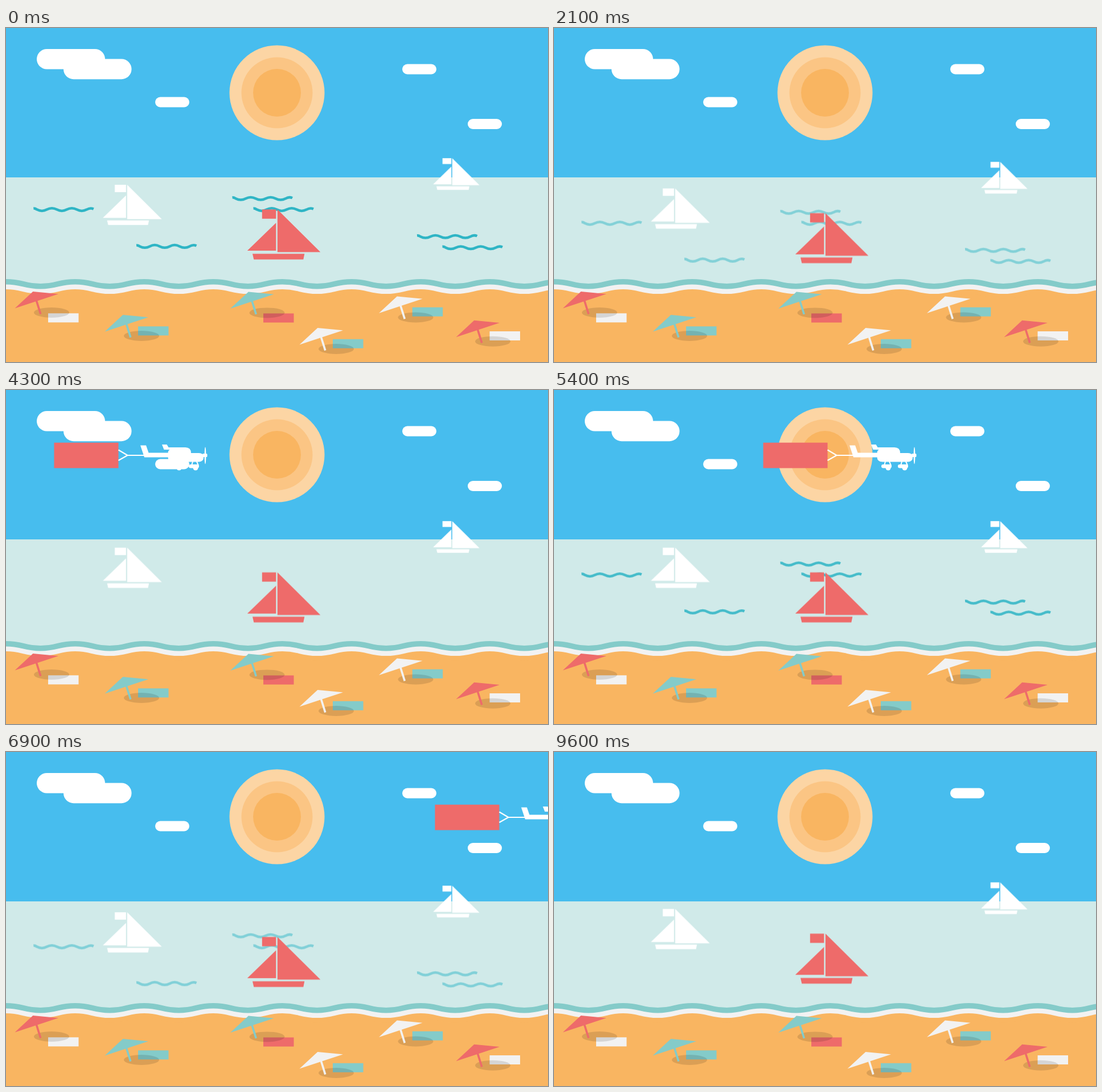
These frames come from a looping animation (952 by 588 pixels, 9700 ms). An HTML page:

```html
<!DOCTYPE html>
<html lang="en">
<head>
<meta charset="utf-8">
<title>Beach</title>
<style>
  html, body { margin: 0; width: 100%; height: 100%; overflow: hidden; background: #47bdee; }
  svg { display: block; width: 100%; height: 100%; }
  :root { --red: #ee6b6a; --teal: #84cbc9; --pale: #f2f2f2; --sand: #f9b561; }

  .ripples { fill: none; stroke: #2fb5c5; stroke-width: 4.5; animation: drift 9.7s infinite; }
  .bob { animation: bob 9.7s infinite; }
  .plane { animation: fly 9.7s infinite; }

  /* Motion advances ten times a second. */
  @keyframes drift {
    0% { transform: translateY(0); opacity: 1; animation-timing-function: steps(40); }
    41.237% { transform: translateY(46px); opacity: 0; animation-timing-function: step-end; }
    50.515% { transform: translateY(.4px); opacity: .98; animation-timing-function: steps(40); }
    91.753%, 100% { transform: translateY(46px); opacity: 0; }
  }
  @keyframes bob {
    0% { transform: translateY(0); animation-timing-function: steps(24); }
    24.742% { transform: translateY(7.4px); animation-timing-function: steps(24); }
    49.485% { transform: translateY(.1px); animation-timing-function: step-end; }
    50.515% { transform: translateY(.1px); animation-timing-function: steps(24); }
    75.258% { transform: translateY(7.4px); animation-timing-function: steps(24); }
    100% { transform: translateY(0); }
  }
  @keyframes fly {
    0%, 28.866% { transform: translateX(-669px); animation-timing-function: steps(50); }
    80.412%, 100% { transform: translateX(617.5px); }
  }
</style>
</head>
<body>
<svg viewBox="0 0 952 588" preserveAspectRatio="none">
  <defs>
    <path id="ripple" d="M0-2Q3-2.2 6 0q8.75 4.6 17.5 0t17.5 0 17.5 0 17.5 0 17.5 0q6-3.8 12-1"/>
    <path id="shore" d="M-30.4 450.5q30.35-8 60.7 0t60.7 0 60.7 0 60.7 0 60.7 0 60.7 0 60.7 0 60.7 0 60.7 0 60.7 0 60.7 0 60.7 0 60.7 0 60.7 0 60.7 0 60.7 0 60.7 0"/>
    <g id="boat">
      <path d="M25.5 0H50V16.2H25.5zM52.5 0L128 75H52.5zM50 23.3V72.5H-.5zM8.7 78H100L98 88H11z"/>
    </g>
    <g id="umbrella">
      <ellipse cx="80" cy="501" rx="31" ry="9" fill="#000" fill-opacity=".12"/>
      <path d="M15.5 493.5L47.3 464 92 468.3zM52 481.5l3.4-1.2L62.5 503l-3.4 1.2z"/>
    </g>
    <rect id="towel" width="53.5" height="16"/>
    <rect id="puff" width="60" height="18" rx="9"/>
    <g id="gear">
      <path d="M7 126L5 133M14 126l3 7" stroke="#fff" stroke-width="2"/>
      <rect y="131" width="18" height="6.5" rx="3.2"/>
      <circle cx="12" cy="137" r="4.5"/>
    </g>
  </defs>

  <rect width="952" height="264" fill="#47bdee"/>
  <g fill="var(--sand)">
    <circle cx="476" cy="114" r="83.5" fill="#fcd5a4"/>
    <circle cx="476" cy="114" r="62.5" fill="#fbc584"/>
    <circle cx="476" cy="114" r="42"/>
  </g>
  <g fill="#fff">
    <rect x="54" y="37" width="120" height="35.5" rx="17.75"/>
    <rect x="101" y="54.5" width="119.5" height="35.7" rx="17.75"/>
    <use href="#puff" x="262" y="121.5"/>
    <use href="#puff" x="696" y="63.5"/>
    <use href="#puff" x="811" y="160"/>
  </g>

  <rect y="263" width="952" height="200" fill="#d0eae9"/>
  <g class="ripples">
    <use href="#ripple" x="48.3" y="319.6"/>
    <use href="#ripple" x="229" y="384.4"/>
    <use href="#ripple" x="397.5" y="300.3"/>
    <use href="#ripple" x="434.5" y="319.6"/>
    <use href="#ripple" x="722" y="367.3"/>
    <use href="#ripple" x="766.5" y="386.8"/>
  </g>
  <g class="bob" fill="#fff">
    <use href="#boat" transform="translate(170.5 276) scale(.805)"/>
    <use href="#boat" transform="translate(750.5 229.2) scale(.634)"/>
    <use href="#boat" transform="translate(424.3 319.6)" fill="var(--red)"/>
  </g>

  <path d="M0 462H952V588H0z" fill="var(--sand)"/>
  <g fill="none" stroke-width="9.5">
    <use href="#shore" y="17.5" stroke="var(--sand)"/>
    <use href="#shore" y="8.8" stroke="var(--pale)"/>
    <use href="#shore" y=".2" stroke="var(--teal)"/>
  </g>

  <g fill="var(--pale)">
    <use href="#towel" x="74" y="502.3"/>
    <use href="#umbrella" fill="var(--red)"/>
    <use href="#towel" x="232" y="525.3" fill="var(--teal)"/>
    <use href="#umbrella" x="158" y="41" fill="var(--teal)"/>
    <use href="#towel" x="452" y="502.5" fill="var(--red)"/>
    <use href="#umbrella" x="378.5" y=".4" fill="var(--teal)"/>
    <use href="#towel" x="713.7" y="491.7" fill="var(--teal)"/>
    <use href="#umbrella" x="639.5" y="8.5"/>
    <use href="#towel" x="574" y="547.8" fill="var(--teal)"/>
    <use href="#umbrella" x="500" y="64"/>
    <use href="#towel" x="849.5" y="534"/>
    <use href="#umbrella" x="775" y="50.7" fill="var(--red)"/>
  </g>

  <g class="plane" fill="#fff">
    <rect x="367.5" y="92.7" width="113" height="44.8" fill="var(--red)"/>
    <path d="M480.5 105.5L496.5 115 480.5 124M496.5 115H528" fill="none" stroke="#fff" stroke-width="2.2"/>
    <path d="M519 97.5h10l4.5 13H570v8H526z"/>
    <path d="M557 96h8.5l3 5H598q10 0 10 10H622q8 0 8 7.5T622 126.5H577q-9.5 0-9.5-8.5V111q0-4 3-6H560.5z"/>
    <rect x="628" y="112" width="8.5" height="6" rx="1.5"/>
    <ellipse cx="633" cy="115.5" rx="1.4" ry="15"/>
    <use href="#gear" x="575"/>
    <use href="#gear" x="604"/>
  </g>
</svg>
</body>
</html>
```
